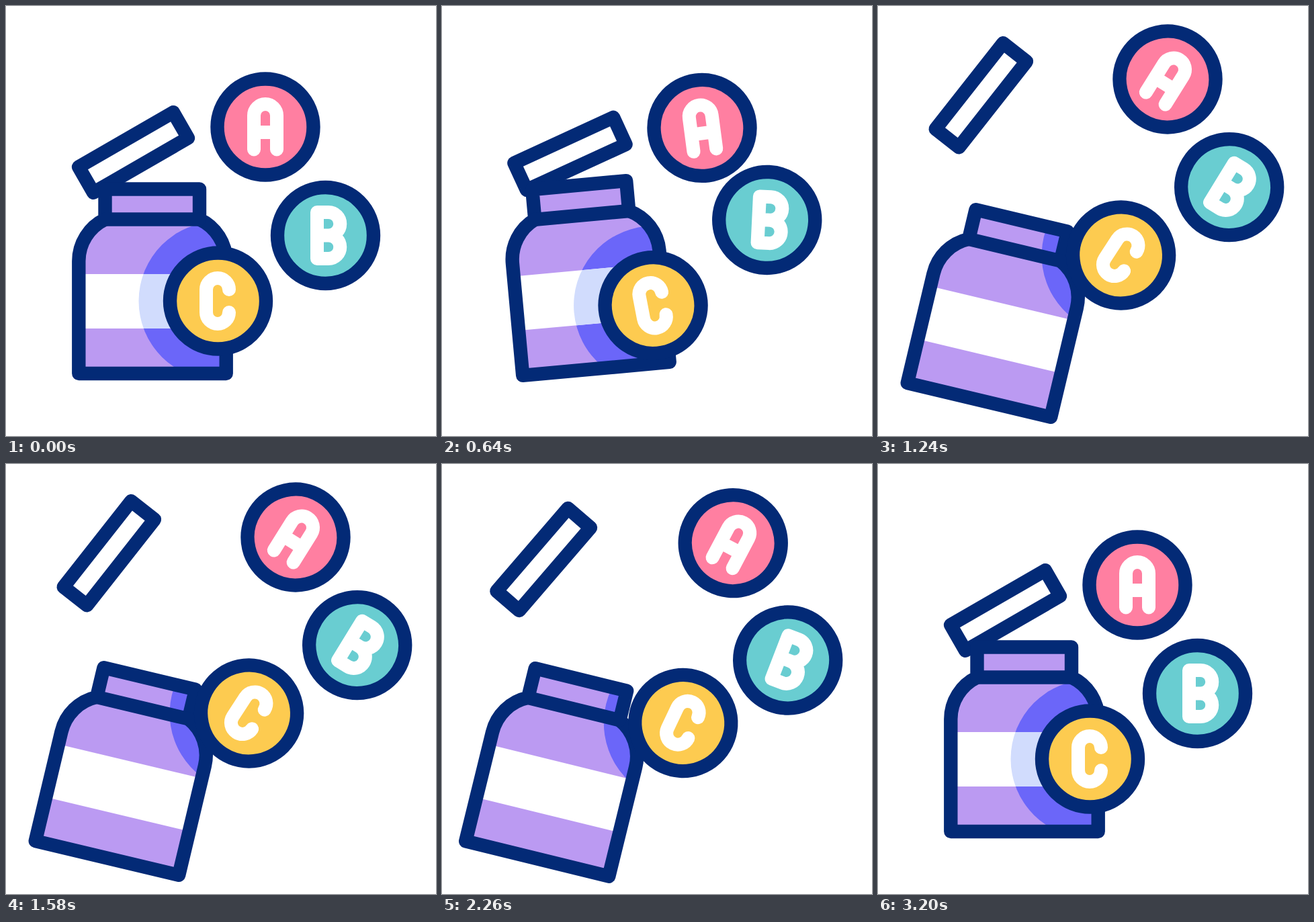
Write an HTML page that moves like this. It is 640x640 px and loops after 3.3 s.

```html
<!DOCTYPE html>
<html lang="en">
<head>
<meta charset="utf-8">
<title>Vitamin bottle</title>
<style>
  html, body { margin: 0; width: 100%; height: 100%; overflow: hidden; background: #fff; }
  svg { display: block; width: 100vw; height: 100vh; }
  .line { stroke: #032a76; stroke-width: 20.4; stroke-linejoin: round; stroke-linecap: round; }
  .glyph { fill: none; stroke: #fff; stroke-width: 20; stroke-linejoin: round; stroke-linecap: round; }
</style>
</head>
<body>
<svg viewBox="0 0 640 640">
  <defs>
    <path id="shape" d="M-70.5-137.5H70V-92.5A69 69 0 0 1 109.7-30V137H-109.7V-30A69 69 0 0 1-70.5-92.5Z"/>
    <rect id="band" x="-109" y="-11" width="218" height="81"/>
    <clipPath id="inside"><use href="#shape"/></clipPath>
    <clipPath id="label"><use href="#band"/></clipPath>
  </defs>

  <g id="lid">
    <rect class="line" x="-81.3" y="-22.1" width="162.6" height="44.2" transform="rotate(-30)" fill="#fff"/>
  </g>

  <g id="bottle">
    <use href="#shape" fill="#bb9af2"/>
    <g clip-path="url(#inside)"><circle class="shade" r="118" fill="#6b66f9"/></g>
    <use href="#band" fill="#fff"/>
    <g clip-path="url(#label)"><circle class="shade" r="118" fill="#d1dcfd"/></g>
    <use href="#shape" class="line" fill="none"/>
    <path class="line" d="M-70.5-92.5H70"/>
  </g>

  <g id="a">
    <circle class="line" r="71.5" fill="#ff7fa1"/>
    <path class="glyph" d="M-17 33.5V-17A17 17 0 0 1 17-17V33.5M-17 8H17"/>
  </g>
  <g id="b">
    <circle class="line" r="71.5" fill="#69cdd1"/>
    <path class="glyph" d="M-12.5-34.5V34.5H4.5a17.25 17.25 0 0 0 0-34.5H-12.5H4.5a17.25 17.25 0 0 0 0-34.5Z"/>
  </g>
  <g id="c">
    <circle class="line" r="71.5" fill="#fdcb50"/>
    <path class="glyph" d="M16.5-17A17 17 0 0 0-17.5-17V17A17 17 0 0 0 16.5 17"/>
  </g>
</svg>

<script>
const LOOP = 3300, START = 100, DRIFT_START = 1580, END = 3200;

// Poses are [x, y, turn]; back and out are offsets from rest.
// throwAt and fallAt are the spans of the throw and of the way home.
const parts = {
  lid:    { rest: [189.5, 218, 0],   back: [1, 4.5, 5.3],       out: [-36.2, -85.2, -21.8], throwAt: [650, 1045], fallAt: [2120, 2740] },
  bottle: { rest: [218, 410, 0],     back: [-1.1, -6.6, -5.3],  out: [-35.8, 43.2, 13.4],   throwAt: [680, 1180], fallAt: [2300, 2910] },
  a:      { rest: [386, 180, 0],     back: [1, 10, -8.5],       out: [45, -71, 32],         throwAt: [600, 1050], fallAt: [2110, 2750] },
  b:      { rest: [475.5, 341.5, 0], back: [-3.5, 12.5, -11],   out: [47.2, -71.9, 31.5],   throwAt: [360, 1100], fallAt: [2060, 2600] },
  c:      { rest: [315.5, 439, 0],   back: [-1.5, 7, -11],      out: [46.1, -68, 33],       throwAt: [670, 1160], fallAt: [2100, 2620] }
};

const LAG = [50, -50, 0];         // the throw lifts first, then turns, then travels
const DRIFT = [1.22, 1.03, 1.03]; // slow reach beyond the thrown pose
const REBOUND = 0.35;             // share of the wind-up repeated on landing

const smooth = u => u * u * (3 - 2 * u);

function follow(stops, time) {
  const t = Math.min(Math.max(time, START), END);
  const i = stops.findIndex(stop => t <= stop[0]);
  if (i === 0) return stops[0][1];
  const [t0, v0] = stops[i - 1], [t1, v1] = stops[i];
  return v0 + (v1 - v0) * smooth((t - t0) / (t1 - t0));
}

function poseAt({ rest, back, out, throwAt, fallAt }, time) {
  return rest.map((base, k) => base + follow([
    [START, 0],
    [throwAt[0] + LAG[k], back[k]],
    [throwAt[1] + LAG[k], out[k]],
    [DRIFT_START, out[k]],
    [fallAt[0], out[k] * DRIFT[k]],
    [fallAt[1], back[k] * REBOUND],
    [END, 0]
  ], time));
}

const shades = document.querySelectorAll('.shade');

function draw(now) {
  const pose = {};
  for (const id in parts) {
    const [x, y, turn] = pose[id] = poseAt(parts[id], now % LOOP);
    document.getElementById(id).setAttribute('transform', `translate(${x} ${y}) rotate(${turn})`);
  }
  // The shadow stays behind badge C, expressed in the bottle's own axes
  const [x, y, turn] = pose.bottle, dx = pose.c[0] - x, dy = pose.c[1] - y;
  const cos = Math.cos(turn * Math.PI / 180), sin = Math.sin(turn * Math.PI / 180);
  for (const shade of shades) {
    shade.setAttribute('cx', dx * cos + dy * sin);
    shade.setAttribute('cy', dy * cos - dx * sin);
  }
}

const begin = performance.now();
function tick() {
  draw(performance.now() - begin);
  requestAnimationFrame(tick);
}
tick();
</script>
</body>
</html>
```
